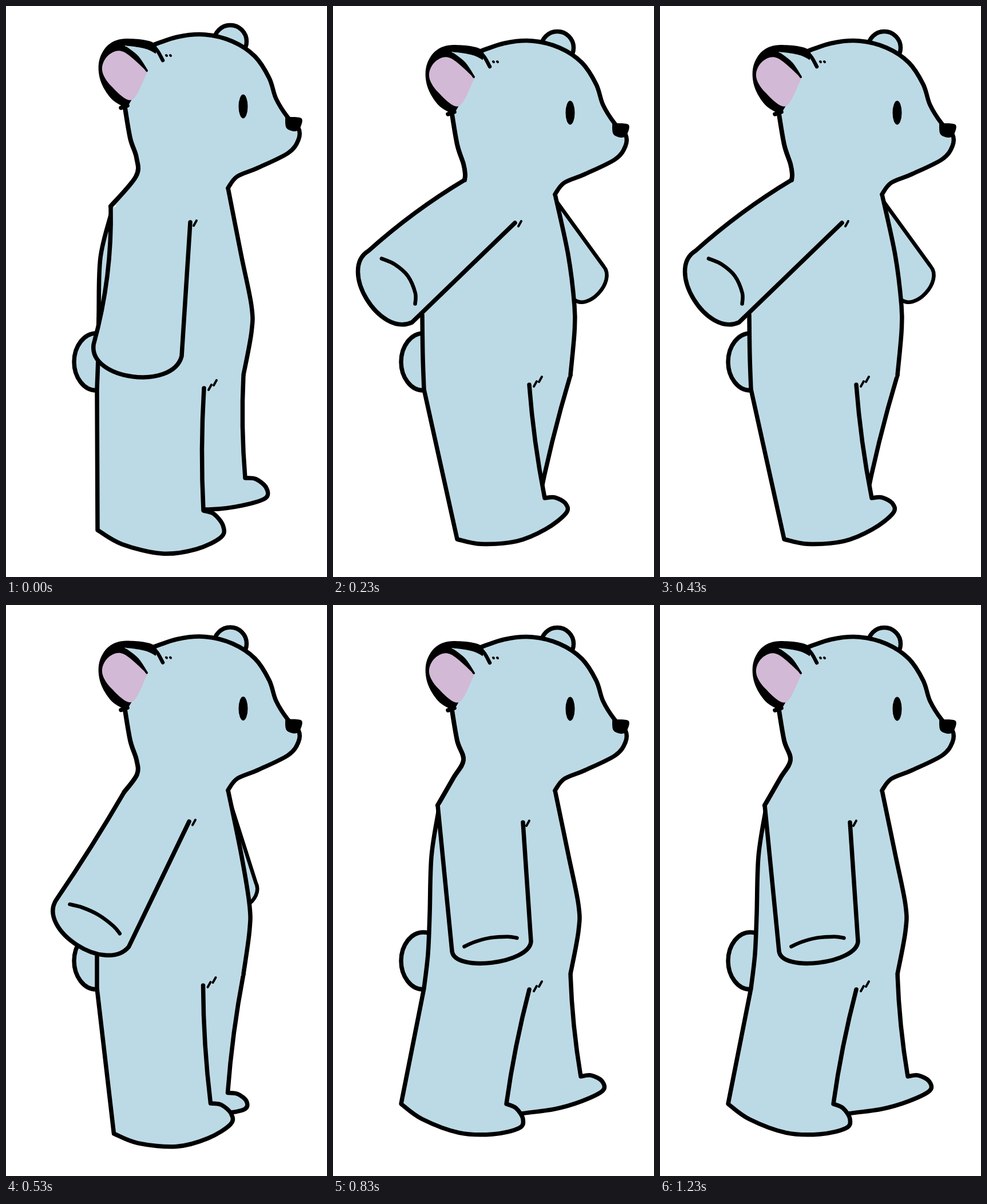
An HTML page with a canvas for the animation above (1.33 s loop, 561 by 998 pixels).

```html
<!DOCTYPE html>
<html lang="en">
<head>
<meta charset="utf-8">
<title>Walking bear</title>
<style>
html, body { margin: 0; width: 100%; height: 100%; overflow: hidden; background: #fff; }
canvas { display: block; }
</style>
</head>
<body>
<canvas id="stage" width="561" height="998"></canvas>
<script>
const ctx = document.getElementById('stage').getContext('2d');
const BLUE = '#bcdae5', PINK = '#d2b9d5', INK = '#000', LINE = 7.5;
const PIVOT = [260, 350], HIP = [415, 645], RUMP = [159, 670], SEAT = [260, 670];

// Limbs hang from back and front joints and end in two corners.
const stand = {
  bob: 0, nape: [227, 298], back: 162, belly: 429, crotch: [346, 668], dash: 1,
  shoulder: [183, 350], armpit: [322, 378], wristA: [153, 592], wristB: [307, 612],
  bulge: 62, bow: -9, palm: 0,
  heel: [160, 916], ankle: [345, 882], depth: 64,
  farHeel: [262, 880], farAnkle: [418, 825], farDepth: 56,
  farTop: [391, 342], farIn: [340, 530], farOut: [400, 515], farRoot: [340, 400]
};
const armBack = {
  bob: 11, nape: [231, 294], back: 156, belly: 422, crotch: [343, 662], dash: 1,
  shoulder: [230, 304], armpit: [318, 379], wristA: [62, 428], wristB: [138, 553],
  bulge: 62, bow: 5, palm: 36,
  heel: [217, 932], ankle: [370, 860], depth: 50,
  farHeel: [210, 890], farAnkle: [357, 880], farDepth: 30,
  farTop: [391, 342], farIn: [420, 512], farOut: [473, 455], farRoot: [345, 400]
};
const armFore = {
  bob: 6, nape: [210, 303], back: 169, belly: 429, crotch: [343, 672], dash: 1,
  shoulder: [183, 350], armpit: [332, 380], wristA: [208, 605], wristB: [346, 588],
  bulge: 38, bow: 0, palm: 15,
  heel: [119, 872], ankle: [303, 872], depth: 53,
  farHeel: [300, 895], farAnkle: [433, 824], farDepth: 50,
  farTop: [280, 425], farIn: [190, 485], farOut: [240, 530], farRoot: [200, 425]
};
const stride = {
  bob: 14, nape: [211, 315], back: 170, belly: 429, crotch: [345, 683], dash: 0,
  shoulder: [182, 363], armpit: [335, 357], wristA: [276, 573], wristB: [401, 538],
  bulge: 42, bow: 7, palm: 35,
  heel: [75, 848], ankle: [245, 878], depth: 53,
  farHeel: [313, 884], farAnkle: [465, 835], farDepth: 56,
  farTop: [260, 425], farIn: [147, 485], farOut: [200, 530], farRoot: [178, 425]
};

const lerp = (a, b, t) => a + (b - a) * t;

// Moves a point on an arc around the shoulder.
function swing(a, b, t) {
  const polar = ([x, y]) => [Math.hypot(x - PIVOT[0], y - PIVOT[1]), Math.atan2(y - PIVOT[1], x - PIVOT[0])];
  const [r1, a1] = polar(a), [r2, a2] = polar(b);
  const r = lerp(r1, r2, t), angle = lerp(a1, a2, t);
  return [PIVOT[0] + r * Math.cos(angle), PIVOT[1] + r * Math.sin(angle)];
}

function mix(a, b, t) {
  const out = {};
  for (const k in a) {
    out[k] = k.startsWith('wrist') ? swing(a[k], b[k], t)
      : Array.isArray(a[k]) ? a[k].map((v, i) => lerp(v, b[k][i], t))
      : lerp(a[k], b[k], t);
  }
  return out;
}

const backSwing = mix(stand, armBack, 0.5);
const farBack = mix(stand, armBack, 1.25);
const foreSwing = mix(armFore, stride, 0.62);
const cycle = [stand, backSwing, armBack, farBack, armBack, backSwing, stand,
               stand, armFore, foreSwing, stride, foreSwing, armFore];

// Smooth line through points, added to a path if one is given.
function curve(pts, path) {
  const at = i => pts[Math.max(0, Math.min(pts.length - 1, i))];
  const slope = (i, k) => (at(i + 1)[k] - at(i - 1)[k]) / 6;
  if (path) path.lineTo(...pts[0]);
  else (path = new Path2D()).moveTo(...pts[0]);
  for (let i = 0; i < pts.length - 1; i++) {
    const [x1, y1] = pts[i], [x2, y2] = pts[i + 1];
    path.bezierCurveTo(x1 + slope(i, 0), y1 + slope(i, 1),
      x2 - slope(i + 1, 0), y2 - slope(i + 1, 1), x2, y2);
  }
  return path;
}

function fill(path, color = BLUE) {
  ctx.fillStyle = color;
  ctx.fill(path);
}

function ink(path, width = LINE) {
  ctx.lineWidth = width;
  ctx.stroke(path);
}

function shape(path, width) {
  fill(path);
  ink(path, width);
}

function ellipse(x, y, rx, ry) {
  const path = new Path2D();
  path.ellipse(x, y, rx, ry, 0, 0, 7);
  return path;
}

function dash(x, y) {
  ink(curve([[x, y], [x + 5, y - 9]]), 4);
}

// Point placed along the line a-b, pushed sideways by a distance.
function beside(a, b, t, side) {
  const dx = b[0] - a[0], dy = b[1] - a[1], len = Math.hypot(dx, dy);
  return [a[0] + dx * t - dy / len * side, a[1] + dy * t + dx / len * side];
}

function arm(root, a, b, top, bulge, bow) {
  const path = new Path2D();
  path.moveTo(...root);
  path.quadraticCurveTo(...beside(root, a, 0.5, bow * 2), ...a);
  path.bezierCurveTo(...beside(a, b, 0, bulge), ...beside(a, b, 0.95, bulge), ...b);
  path.lineTo(...top);
  return path;
}

// A round sole has sole = 1; smaller values flatten it.
function leg(root, heel, ankle, top, depth, sole) {
  const len = Math.hypot(ankle[0] - heel[0], ankle[1] - heel[1]);
  const foot = [[0, 0], [0.2, 0.5 * sole * sole], [0.55, 0.95 * sole], [0.87, Math.sqrt(sole)],
    [1 + 22 / len, 0.8], [1 + 29 / len, 0.5], [1 + 17 / len, 0.14], [1, 0]];
  const path = new Path2D();
  path.moveTo(...root);
  curve(foot.map(([t, v]) => beside(heel, ankle, t, v * depth)), path);
  path.quadraticCurveTo(...beside(ankle, top, 0.5, -6), ...top);
  return path;
}

function drawTorso(p) {
  const chin = [388, 318 + p.bob];
  const belly = [chin, [411, 435], [p.belly, 524], [p.belly, 570], HIP];
  const back = [RUMP, [lerp(p.back, RUMP[0], 0.3), 610], [p.back, 540], [p.back + 3, 440], [184, 362]];
  const body = curve(belly);
  body.lineTo(330, 700);
  curve(back, body);
  body.lineTo(...p.nape);
  body.lineTo(310, 250);
  fill(body);
  ink(curve(belly));
  // The raised arm hides the upper back.
  ink(curve(p.shoulder[0] > 184 ? back.slice(0, 3) : back));
}

function drawEar() {
  fill(curve([[211, 179], [184, 162], [165, 130], [163, 95], [180, 67], [212, 57],
    [262, 68], [247, 114], [211, 179]]), INK);
  fill(curve([[207, 69], [236, 73], [256, 80], [270, 94], [262, 122], [247, 113], [230, 90], [207, 69]]));
  fill(curve([[247, 115], [220, 164], [184, 140], [168, 112], [178, 87], [205, 80], [247, 115]]), PINK);
  ink(curve([[210, 73], [230, 89], [246, 113]]), 4);
  ink(curve([[235, 66], [260, 73], [274, 95]]), 6.5);
  ink(curve([[201, 178], [212, 174]]));
}

function drawHead(p) {
  const skull = [[252, 70], [300, 54], [348, 50], [396, 62], [435, 88], [460, 126], [472, 162],
    [492, 194], [511, 213], [511, 234], [493, 257], [440, 283], [404, 298], [388, 318]];
  const neck = [[207, 172], [217, 231], [228, 265], [p.nape[0], p.nape[1] - p.bob],
    [p.shoulder[0], p.shoulder[1] - p.bob]];
  ctx.save();
  ctx.translate(0, p.bob);
  shape(ellipse(392, 62, 28.5, 28.5));
  fill(curve(neck.slice().reverse(), curve(skull)));
  ink(curve(skull));
  ink(curve(neck), 8);
  drawEar();
  for (const x of [280, 287]) ink(curve([[x, 86], [x + 1, 87]]), 4);
  fill(curve([[488, 194], [516, 196], [514, 213], [505, 219], [490, 213], [488, 194]]), INK);
  fill(ellipse(414.5, 175.5, 8, 21), INK);
  ctx.restore();
}

function drawPalm(p) {
  const arc = [[0.16, 0.35], [0.3, 0.75], [0.5, 1], [0.72, 0.88], [0.83, 0.6]];
  ink(curve(arc.map(([t, v]) => beside(p.wristA, p.wristB, t, -v * p.palm))), 6.5);
}

function draw(p) {
  ctx.fillStyle = '#fff';
  ctx.fillRect(0, 0, 561, 998);
  ctx.strokeStyle = INK;
  ctx.lineCap = ctx.lineJoin = 'round';

  shape(ellipse(158, 622, 39, 50));
  shape(arm(p.farRoot, p.farIn, p.farOut, p.farTop, 34, 0), 6.5);
  shape(leg(SEAT, p.farHeel, p.farAnkle, HIP, p.farDepth, 0.6));
  drawTorso(p);
  shape(leg(RUMP, p.heel, p.ankle, p.crotch, p.depth, 1));
  shape(arm(p.shoulder, p.wristA, p.wristB, p.armpit, p.bulge, p.bow));
  drawHead(p);
  if (p.palm) drawPalm(p);

  const [x, y] = p.crotch;
  dash(x + 8, y + 3);
  dash(x + 17, y - 5);
  if (p.dash > 0.5) dash(p.armpit[0] + 6, p.armpit[1] + 6);
}

const FIRST = 130, STEP = 100, LOOP = 1330;
const start = performance.now();
let shown = -1;

function tick(now) {
  const t = Math.max(0, now - start) % LOOP;
  const i = t < FIRST ? 0 : 1 + Math.floor((t - FIRST) / STEP);
  if (i !== shown) draw(cycle[shown = i]);
  requestAnimationFrame(tick);
}
tick(start);
</script>
</body>
</html>
```
